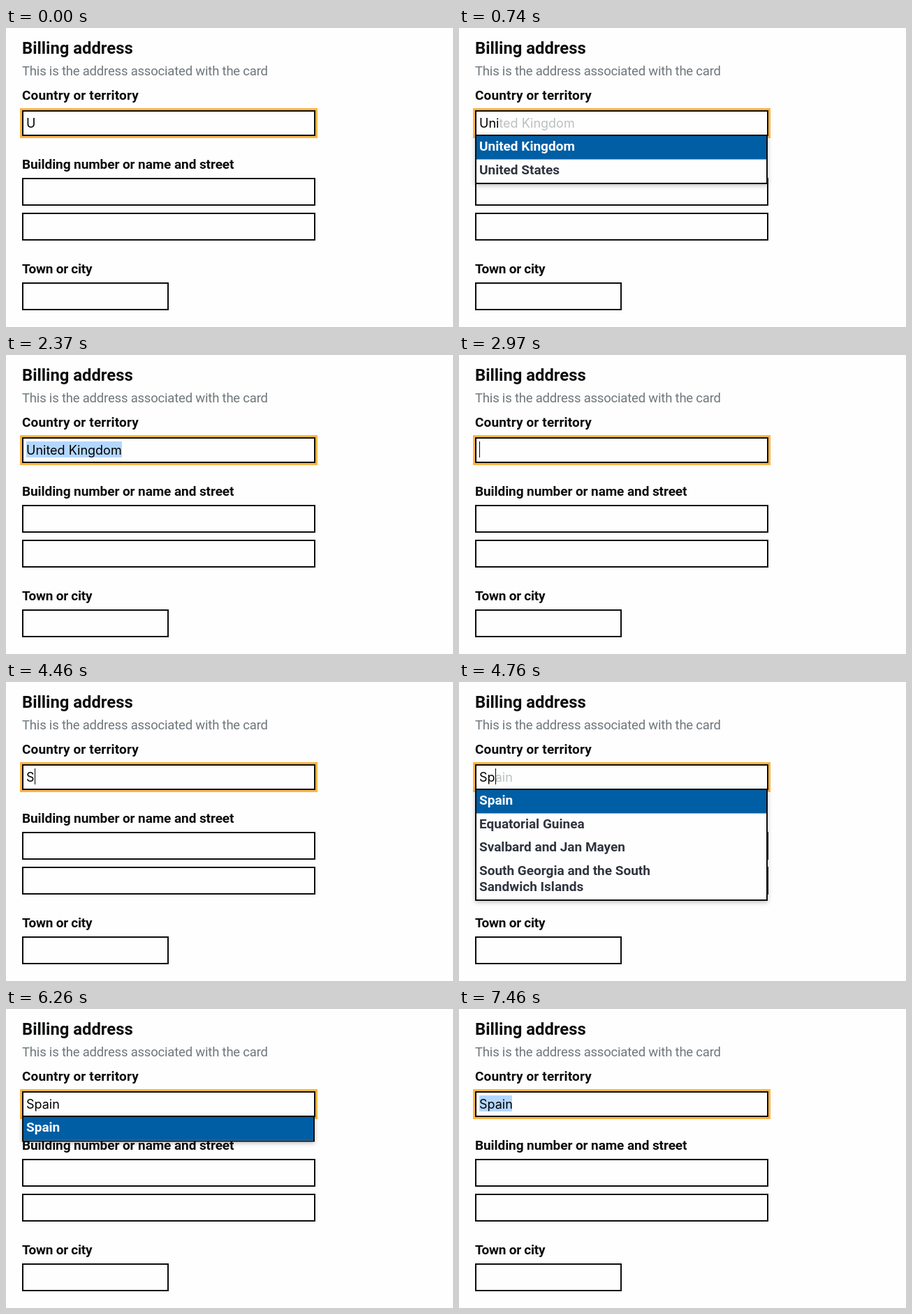
These frames come from a looping animation (640x429 px, 8 s). An HTML page:

```html
<!DOCTYPE html>
<html lang="en">
<head>
<meta charset="utf-8">
<title>Billing address</title>
<style>
  html, body { margin: 0; width: 100%; height: 100%; overflow: hidden; background: #fefefe; }
  svg { display: block; width: 640px; height: 429px; }
  text { white-space: pre; fill: #0b0c0c; }
  .bold { font: 700 19px Roboto, Arial, sans-serif; }
  .title { font-size: 23.8px; }
  .hint { font: 400 18.5px Roboto, Arial, sans-serif; letter-spacing: -.2px; fill: #6f777b; }
  .value { font: 400 18px Inter, Arial, sans-serif; fill: #000; }
  .rest { fill: #bcbfc1; }
  .box { fill: #fefefe; stroke: #0b0c0c; stroke-width: 2; }
  #menu { filter: drop-shadow(0 2px 3px rgba(0, 0, 0, .26)); }
  #menu text { fill: #30343f; }
  #menu .on { fill: #fff; }
</style>
</head>
<body>
<svg viewBox="0 0 640 429">
  <text class="bold title" x="23" y="37">Billing address</text>
  <text class="hint" x="23" y="68">This is the address associated with the card</text>
  <text class="bold" x="23" y="103" letter-spacing=".15">Country or territory</text>
  <rect x="20" y="115" width="426" height="43" fill="#fdb441"/>
  <rect class="box" x="24" y="119" width="418" height="35"/>
  <rect id="mark" x="29" y="124" height="23" fill="#b3d7fe"/>
  <text class="value" x="29" y="143"><tspan id="typed"></tspan><tspan id="rest" class="rest"></tspan></text>
  <rect id="caret" y="124" width="1" height="23"/>
  <text class="bold" x="23" y="202" letter-spacing="-.08">Building number or name and street</text>
  <rect class="box" x="24" y="216" width="418" height="38"/>
  <rect class="box" x="24" y="266" width="418" height="38"/>
  <text class="bold" x="23" y="352" letter-spacing="-.25">Town or city</text>
  <rect class="box" x="24" y="366" width="208" height="38"/>
  <g id="menu"></g>
</svg>
<script>
const LOOP = 8000, ROW = 33.5, LINE = 23;
const $ = id => document.getElementById(id);

const UK = ["United Kingdom", "United States"];
const SPA = ["Spain", "Equatorial Guinea"];
const SP = [...SPA, "Svalbard and Jan Mayen", "South Georgia and the South\nSandwich Islands"];

// caret and mark hold an x position; 0 hides them
const steps = [
  { at: 0, typed: "U" },
  { at: 140, typed: "Uni", rest: "ted Kingdom", caret: 55, menu: UK },
  { at: 740, caret: 0 },
  { at: 1190, caret: 55 },
  { at: 1340, typed: "United Kingdom", rest: "", caret: 166, menu: [] },
  { at: 1790, caret: 0 },
  { at: 2230, caret: 166 },
  { at: 2370, caret: 0, mark: 166 },
  { at: 2970, typed: "", caret: 29, mark: 0 },
  { at: 3420, caret: 0 },
  { at: 3870, caret: 29 },
  { at: 4460, typed: "S", caret: 41 },
  { at: 4760, typed: "Sp", rest: "ain", caret: 52, menu: SP },
  { at: 5060, typed: "Spa", rest: "in", caret: 62, menu: SPA },
  { at: 5510, typed: "Spai", rest: "n", caret: 66, menu: ["Spain"] },
  { at: 5810, typed: "Spain", rest: "", caret: 77 },
  { at: 6260, caret: 0 },
  { at: 6710, caret: 77, menu: [] },
  { at: 7310, caret: 0 },
  { at: 7460, mark: 76 }
];

// each step keeps whatever it does not change
let state = { typed: "", rest: "", caret: 0, mark: 0, menu: [] };
const states = steps.map(step => (state = { ...state, ...step }));

function add(tag, attrs, text = "") {
  const el = document.createElementNS("http://www.w3.org/2000/svg", tag);
  for (const key in attrs) el.setAttribute(key, attrs[key]);
  el.textContent = text;
  $("menu").append(el);
  return el;
}

function drawMenu(items) {
  $("menu").replaceChildren();
  if (!items.length) return;
  const frame = add("rect", { class: "box", x: 24, y: 154, width: 417 });
  add("rect", { x: 25, y: 155, width: 415, height: ROW, fill: "#005ea5" });
  let y = 155;
  items.forEach((item, i) => {
    const lines = item.split("\n");
    lines.forEach((line, n) =>
      add("text", { class: i ? "bold" : "bold on", x: 29, y: y + 21 + n * LINE }, line));
    y += ROW + (lines.length - 1) * LINE;
  });
  frame.setAttribute("height", y - 153);
}

function show(s) {
  $("typed").textContent = s.typed;
  $("rest").textContent = s.rest;
  $("caret").setAttribute("x", s.caret);
  $("caret").style.display = s.caret ? "" : "none";
  $("mark").setAttribute("width", Math.max(0, s.mark - 29));
  drawMenu(s.menu);
}

let current;
function tick() {
  const t = performance.now() % LOOP;
  const next = states.findLast(s => s.at <= t);
  if (next !== current) show(current = next);
  requestAnimationFrame(tick);
}
tick();
</script>
</body>
</html>
```
